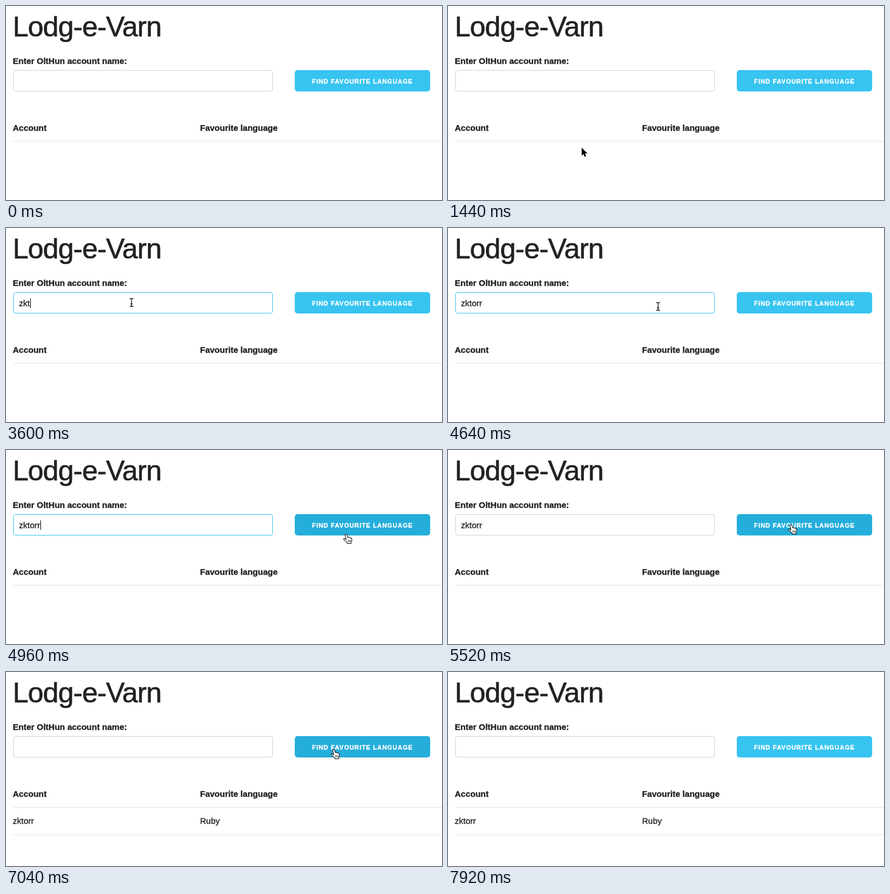
Write an HTML page with a canvas that moves like this. It is 773 px wide and 345 px high and loops after 8.88 s.

```html
<!DOCTYPE html>
<html lang="en">
<head>
<meta charset="utf-8">
<title>Favourite language finder</title>
<style>
  html, body { margin: 0; width: 100%; height: 100%; overflow: hidden; background: #fff; }
  canvas { display: block; }
</style>
</head>
<body>
<canvas id="stage" width="773" height="345"></canvas>
<script>
const ctx = document.getElementById('stage').getContext('2d');
const LOOP = 8880, STEP = 80, BLINK = 480;
const FAMILY = '"Liberation Sans", Arial, sans-serif';
const INK = '#222', BLUE = '#37c4f0', DEEP = '#25aedb';
const ACCOUNT = 'zktorr';

const FOCUS = 2400, BLUR = 5360, RESULT = 6160;
const KEYS = [3280, 3440, 3600, 3760, 3920, 4000];

// Pointer path: time, x, y. Equal neighbours are rests.
const PATH = [
  [720, 243, 291], [880, 238, 256], [1360, 238, 256],
  [2080, 222, 132], [4400, 222, 132],
  [4960, 603, 150], [5200, 607, 135], [5280, 607, 135],
  [5520, 608, 133], [6960, 608, 133],
  [7040, 581, 138], [7920, 452, 362]
];

const smooth = u => u * u * (3 - 2 * u);

function pointerAt(t) {
  if (t < PATH[0][0] || t >= PATH[PATH.length - 1][0]) return null;
  const i = PATH.findIndex(p => p[0] > t);
  const [t0, x0, y0] = PATH[i - 1], [t1, x1, y1] = PATH[i];
  const k = smooth((t - t0) / (t1 - t0));
  return { x: Math.round(x0 + (x1 - x0) * k), y: Math.round(y0 + (y1 - y0) * k) };
}

const inside = (p, x, y, w, h) => p && p.x >= x && p.x < x + w && p.y >= y && p.y < y + h;

// A hairline outline gives the letters a slightly heavier weight.
function text(str, x, y, { size = 15, weight = 400, color = INK, spacing = 0 } = {}) {
  ctx.font = `${weight} ${size}px ${FAMILY}`;
  ctx.letterSpacing = spacing + 'px';
  ctx.fillStyle = ctx.strokeStyle = color;
  ctx.lineWidth = 0.25 + size / 120;
  ctx.lineJoin = 'round';
  ctx.fillText(str, x, y);
  ctx.strokeText(str, x, y);
}

function box(x, y, w, h, r) {
  ctx.beginPath();
  ctx.roundRect(x, y, w, h, r);
}

function rule(y) {
  ctx.fillStyle = '#e1e1e1';
  ctx.fillRect(13, y, 760, 1);
}

function field(t) {
  const focused = t >= FOCUS && t < BLUR;
  box(13.5, 114.5, 459, 37, 3.5);
  ctx.lineWidth = 1;
  ctx.strokeStyle = focused ? BLUE : '#d1d1d1';
  ctx.stroke();

  const typed = t < RESULT ? KEYS.filter(k => k <= t) : [];
  const value = ACCOUNT.slice(0, typed.length);
  text(value, 23, 139);
  const since = t - (typed.length ? typed[typed.length - 1] : FOCUS);
  if (focused && Math.floor(since / BLINK) % 2 === 0) {
    ctx.fillStyle = '#000';
    ctx.fillRect(Math.floor(24.3 + ctx.measureText(value).width), 125, 1, 17);
  }
}

function button(active) {
  box(512, 114, 240, 38, 5);
  ctx.fillStyle = active ? DEEP : BLUE;
  ctx.fill();
  text('FIND FAVOURITE LANGUAGE', 542.5, 138, { size: 11, weight: 700, color: '#fff', spacing: 0.95 });
}

const ARROW = new Path2D('M0 0V14.2L3.2 11.2L5.4 16.2L7.9 15.1L5.7 10.2H10.2Z');
const HAND = new Path2D('M-1.9 1.6Q-1.6 -.5 0 -.4Q1.2 -.2 1.8 1.6L3 5.4Q4.4 4.3 5.4 5.8' +
  'Q7 4.9 7.9 6.6Q9.7 6.2 10 8.2L10.1 11.2L8.8 14V16.3H2V14.6L-3.9 9.6Q-5.2 7.4 -3 7.3L.1 9.2Z');
const KNUCKLES = new Path2D('M3.4 10V13.6M5.4 10V13.6M7.4 10V13.6');
const BEAM = new Path2D('M-3.5 -7H-2Q0 -7 0 -5V5Q0 7 -2 7H-3.5M3.5 -7H2Q0 -7 0 -5V5Q0 7 2 7H3.5M-2 2.5H2');

function pointer(p, kind) {
  ctx.save();
  ctx.translate(p.x, p.y);
  ctx.lineJoin = 'round';
  if (kind === 'beam') {
    ctx.translate(0.5, 0.5);
    ctx.lineWidth = 1.4;
    ctx.strokeStyle = '#222';
    ctx.stroke(BEAM);
  } else if (kind === 'hand') {
    ctx.fillStyle = '#fff';
    ctx.fill(HAND);
    ctx.lineWidth = 1.2;
    ctx.strokeStyle = '#222';
    ctx.stroke(HAND);
    ctx.lineWidth = 0.9;
    ctx.stroke(KNUCKLES);
  } else {
    ctx.lineWidth = 2;
    ctx.strokeStyle = '#fff';
    ctx.stroke(ARROW);
    ctx.fillStyle = '#000';
    ctx.fill(ARROW);
  }
  ctx.restore();
}

function draw(time) {
  const t = Math.floor(time % LOOP / STEP) * STEP;
  const p = pointerAt(t);
  // The refreshed page keeps a plain arrow until the pointer moves again.
  const refreshed = t >= RESULT && t < 7040;
  const onButton = !refreshed && inside(p, 512, 114, 240, 38);

  ctx.fillStyle = '#fff';
  ctx.fillRect(0, 0, 773, 345);
  text('Lodg-e-Varn', 12, 54, { size: 50, spacing: -1 });
  text('Enter OltHun account name:', 12, 103, { weight: 700 });
  field(t);
  button(onButton);
  text('Account', 12, 222, { weight: 700 });
  text('Favourite language', 344, 222, { weight: 700 });
  rule(240);
  if (t >= RESULT) {
    text(ACCOUNT, 12, 270);
    text('Ruby', 344, 270);
    rule(289);
  }
  if (p) pointer(p, onButton ? 'hand' : inside(p, 13, 114, 460, 38) ? 'beam' : 'arrow');
}

const start = performance.now();
function frame() {
  draw(performance.now() - start);
  requestAnimationFrame(frame);
}
frame();
</script>
</body>
</html>
```
